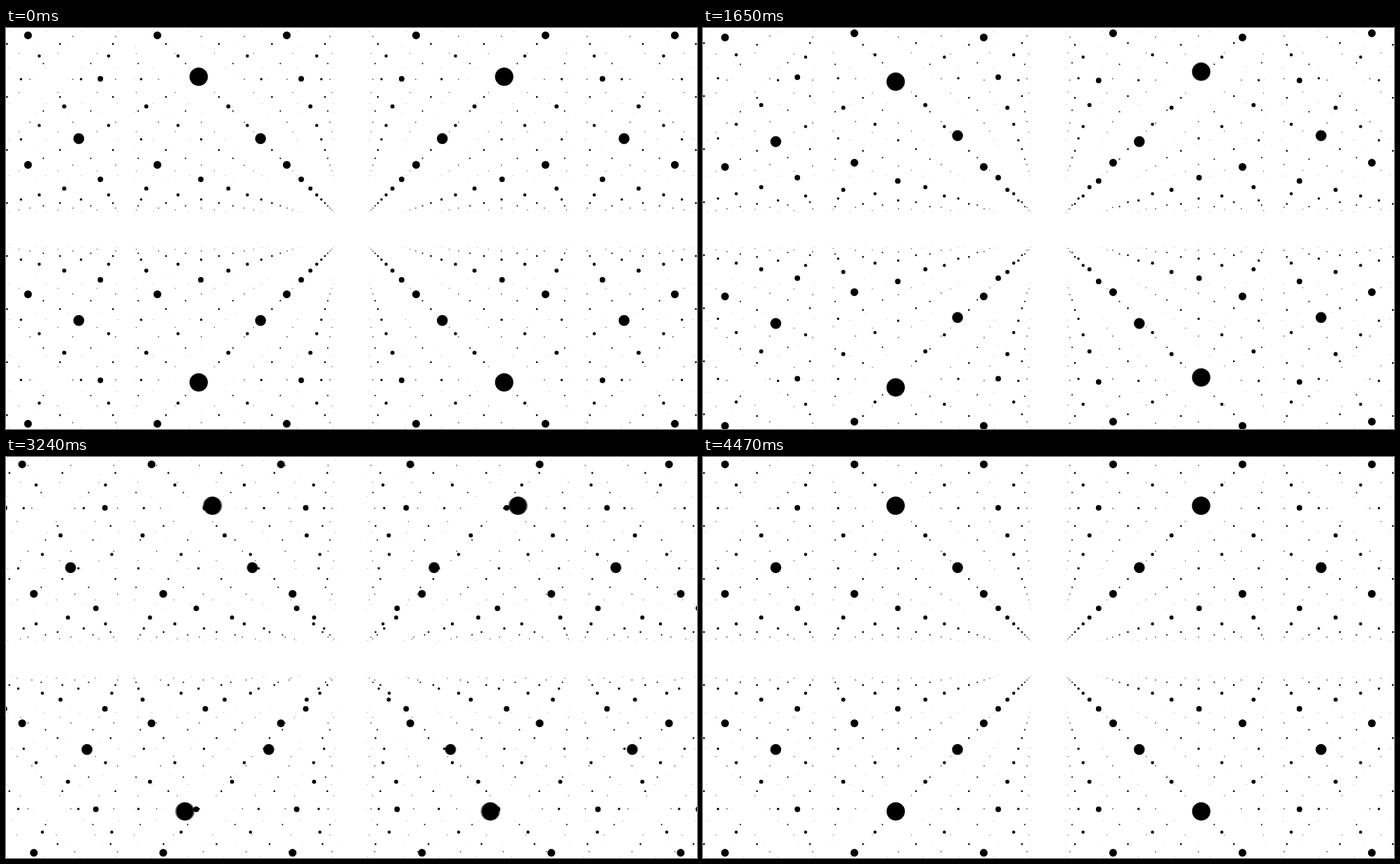
An HTML page with a canvas that plays this animation: 983x570 px, repeating every 4.5 s.

```html
<!DOCTYPE html>
<html>
<head>
<meta charset="utf-8">
<style>
  html, body { margin: 0; width: 100%; height: 100%; overflow: hidden; background: #fff; }
  canvas { display: block; }
</style>
</head>
<body>
<canvas id="stage" width="983" height="570"></canvas>
<script>
const ctx = document.getElementById('stage').getContext('2d');
const W = 983, H = 570, CX = 491.4, CY = 286.5;
const FOCAL = 638.4, NEAR = 0.469, LAYERS = 15, RADIUS = 0.03;
const STEP = 30, STEPS = 150, PHASE = 50;
const SAMPLES = 5, SHUTTER = 0.6;

function ease(p) {
  if (p > 0.5) return 1 - ease(1 - p);
  const smoother = p * p * p * (p * (6 * p - 15) + 10);
  return (2 * p * p + smoother) / 2;
}

const sign = n => n & 1 ? -1 : 1;

function addDot(x, y, z) {
  const scale = FOCAL / z;
  const r = RADIUS * scale * Math.min(1, (15.5 - z) / 12);
  const px = CX + x * scale, py = CY + y * scale;
  if (r <= 0 || px < -r || px > W + r || py < -r || py > H + r) return;
  ctx.moveTo(px + r, py);
  ctx.arc(px, py, r, 0, 2 * Math.PI);
}

// Neighbours in a cubic lattice trade places along z, then y, then x.
function drawLattice(time) {
  const phase = Math.floor(time / PHASE) % 3;
  const shift = ease(time % PHASE / PHASE);
  ctx.beginPath();
  for (let n = 0; n <= LAYERS; n++) {
    const cols = Math.ceil(CX / FOCAL * (n + 1.5)) + 2;
    const rows = Math.ceil(CY / FOCAL * (n + 1.5)) + 2;
    for (let i = -cols; i < cols; i++) {
      for (let j = -rows; j < rows; j++) {
        let x = i + 0.5, y = j + 0.5, z = n + NEAR;
        if (phase === 0) z += sign(i + j) * shift;
        else if (phase === 1) y += sign(i + n) * shift;
        else x += sign(j + n) * shift;
        if (z > 0.9) addDot(x, y, z);
      }
    }
  }
  ctx.fill();
}

let last = -1;
function render(now) {
  const step = Math.floor(now / STEP) % STEPS;
  if (step !== last) {
    last = step;
    ctx.clearRect(0, 0, W, H);
    // Summed alpha averages the samples into motion blur.
    ctx.globalCompositeOperation = 'lighter';
    ctx.globalAlpha = 1 / SAMPLES;
    for (let k = 0; k < SAMPLES; k++) drawLattice(step + SHUTTER * (k + 0.5) / SAMPLES);
  }
  requestAnimationFrame(render);
}
requestAnimationFrame(render);
</script>
</body>
</html>
```
